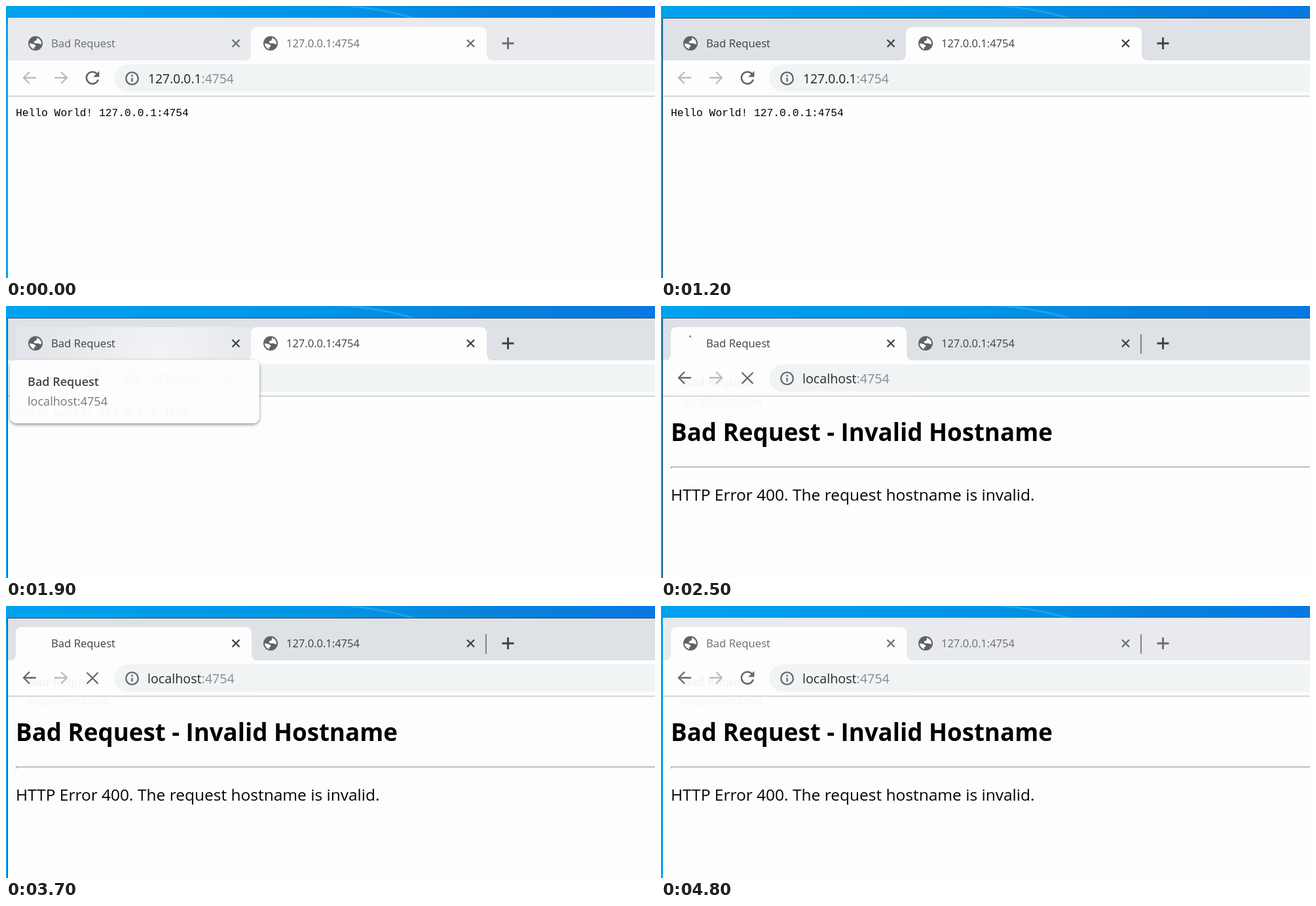
Recreate the animation shown at these times as an HTML page. Size 991 px wide and 415 px high, loop 4.9 s.

```html
<!DOCTYPE html>
<html lang="en">
<head>
<meta charset="utf-8">
<title>Browser tabs</title>
<style>
  html, body { margin: 0; height: 100%; overflow: hidden; }
  svg { display: block; width: 991px; height: 415px; font-family: "Open Sans", "Noto Sans", sans-serif; }
  text { white-space: pre; }
  .line { fill: none; stroke-width: 2.3; }
  #chrome { --ink: #3c4043; --strip: #dee1e6; }
  #chrome.idle { --ink: #6a6d71; --strip: #e8eaed; }
  .title { font-size: 16.7px; fill: var(--ink); }
  .ink { stroke: var(--ink); }
  .url { font-size: 19.3px; fill: #202124; }
  .port { fill: #80868b; }
</style>
</head>
<body>
<svg viewBox="0 0 991 415">
  <defs>
    <linearGradient id="sky">
      <stop offset="0" stop-color="#00a2f0"/>
      <stop offset=".5" stop-color="#0094e6"/>
      <stop offset=".75" stop-color="#0682dc"/>
      <stop offset="1" stop-color="#0878e2"/>
    </linearGradient>
    <radialGradient id="glow" gradientUnits="userSpaceOnUse" cx="220" cy="72" r="190">
      <stop offset="0" stop-color="#fff" stop-opacity=".6"/>
      <stop offset="1" stop-color="#fff" stop-opacity=".15"/>
    </radialGradient>
    <filter id="shadow" x="-10%" y="-20%" width="120%" height="150%">
      <feDropShadow dx="0" dy="2" stdDeviation="2.5" flood-color="#000" flood-opacity=".45"/>
    </filter>
    <path id="tab" d="M-10 83q10 0 10-10V42q0-10 10-10H350q10 0 10 10V73q0 10 10 10z"/>
    <g id="globe">
      <circle r="11" fill="#5f6368"/>
      <path fill="#fdfdfd" d="M2-8.5C6-7.5 9-4 9 0V1C7 2 6 0 4 0H0C-3 0-3-4 0-4C2-4 2-6 2-8.5zM-9 0L-3.5 1C0 2 1 4 0 5L-2 6V8.7C-6 7.5-9 4-9 0z"/>
    </g>
    <path id="close" d="M-5.5-5.5l11 11m0-11l-11 11"/>
    <path id="arrow" d="M10 0H-9M0-9L-9 0L0 9"/>
  </defs>

  <rect width="991" height="415" fill="url(#sky)"/>
  <path d="M510 0q60 5 105 18h12Q580 5 540 0z" fill="#5cc4ff" opacity=".35"/>

  <g id="chrome">
    <rect x="3" y="18" width="988" height="70" fill="var(--strip)"/>
    <path id="edge" class="line" d="M2.5 415V18.5H991" stroke="#1b4a70" style="stroke-width:1"/>
    <rect x="3" y="83" width="988" height="332" fill="#fdfdfd"/>
    <use id="hover" href="#tab" x="15" fill="url(#glow)"/>
    <use id="activeTab" href="#tab" fill="#fdfdfd"/>
    <path id="divider" d="M733 43V73" stroke="#80848a" stroke-width="2"/>
    <use id="icon0" href="#globe" x="45" y="57"/>
    <use id="icon1" href="#globe" x="404" y="57"/>
    <circle id="dot" cy="46.5" r="1.7" fill="#8b8e92"/>
    <text class="title" x="69" y="63">Bad Request</text>
    <text class="title" x="428" y="63" style="font-size:16.5px">127.0.0.1:4754</text>
    <g class="line ink">
      <use href="#close" x="351" y="57"/>
      <use href="#close" x="709.5" y="57"/>
      <path d="M757.5 57h18m-9-9v18" stroke-width="2.8"/>
    </g>
  </g>

  <g class="line" stroke="#5f6368">
    <use id="back" href="#arrow" x="36" y="109.5"/>
    <use href="#arrow" transform="translate(84 109.5) scale(-1 1)" stroke="#b9bcc0"/>
    <path id="stop" d="M123.5 101.5l17 17m0-17l-17 17"/>
  </g>
  <path id="reload" fill="#5f6368" transform="translate(116.4 94) scale(1.3)" d="M17.65 6.35C16.2 4.9 14.21 4 12 4c-4.42 0-7.99 3.58-7.99 8s3.57 8 7.99 8c3.73 0 6.84-2.55 7.73-6h-2.08c-.82 2.33-3.04 4-5.65 4-3.31 0-6-2.69-6-6s2.69-6 6-6c1.66 0 3.14.69 4.22 1.78L13 11h7V4z"/>
  <rect x="165" y="89" width="860" height="42" rx="21" fill="#f1f4f5"/>
  <g class="line" stroke="#5f6368">
    <circle cx="192.5" cy="110.5" r="9.3"/>
    <path d="M192.5 109.5v6m0-10.5v2.4"/>
  </g>
  <path d="M3 137.5H991" stroke="#b5b6b8"/>

  <g id="hello">
    <text class="url" x="217" y="118">127.0.0.1<tspan class="port">:4754</tspan></text>
    <text id="greeting" x="15" y="168" font-size="16.3" font-family="'Liberation Mono', monospace">Hello World! 127.0.0.1:4754</text>
  </g>
  <g id="error">
    <text class="url" x="216" y="118" style="font-size:19.7px">localhost<tspan class="port">:4754</tspan></text>
    <text x="15" y="206" font-size="36.7" font-weight="700">Bad Request - Invalid Hostname</text>
    <path d="M15 245.5H991M15.5 245v3" stroke="#959595"/>
    <path d="M16 247H991" stroke="#e6e6e6"/>
    <text x="15" y="297" font-size="24.5">HTTP Error 400. The request hostname is invalid.</text>
  </g>

  <g id="card">
    <rect x="6" y="82" width="381" height="97" rx="10" fill="#fefefe" filter="url(#shadow)"/>
    <text x="33" y="122" font-size="18" font-weight="600" fill="#3c4043">Bad Request</text>
    <text x="33" y="152" font-size="18.1" fill="#70757a">localhost:4754</text>
  </g>
</svg>
<script>
  const LOOP = 4900;
  const $ = id => document.getElementById(id);
  const show = (id, opacity) => $(id).setAttribute('opacity', +opacity);

  // Each entry holds from its time until the next one.
  const loading = [[0, ''], [700, 'dot'], [800, ''], [1100, 'dot'], [1200, ''],
    [2500, 'dot'], [2600, ''], [2900, 'dot'], [3000, ''], [3100, 'dot'], [3200, 'blank'],
    [3400, ''], [3500, 'dot'], [3600, 'blank'], [3800, ''],
    [4300, 'dot'], [4400, 'blank'], [4600, '']];
  const hover = [[0, 0], [1600, .5], [1700, .8], [1800, 1], [2000, 0]];
  const card = [[0, 0], [1700, .5], [1800, .93], [1900, .97], [2000, .4], [2100, .04]];
  const edge = [[0, 0], [300, .5], [400, 1], [4800, 0]];
  const valueAt = (track, t) => track.findLast(([start]) => start <= t)[1];

  function draw() {
    const t = performance.now() % LOOP;
    const onError = t >= 2000;
    const state = valueAt(loading, t);
    const current = onError ? 0 : 1;

    $('chrome').classList.toggle('idle', t < 300 || t >= 4800);
    $('activeTab').setAttribute('x', onError ? 15 : 374);
    $('back').setAttribute('stroke', onError ? '#5f6368' : '#b9bcc0');
    $('dot').setAttribute('cx', onError ? 44.5 : 403.5);
    for (const i of [0, 1]) show('icon' + i, i !== current || !state);
    show('dot', state === 'dot');
    show('stop', state !== '');
    show('reload', state === '');
    show('divider', onError);
    show('hello', !onError);
    show('error', onError);
    show('greeting', t < 1100 || t >= 1200);
    show('hover', valueAt(hover, t));
    show('card', valueAt(card, t));
    show('edge', valueAt(edge, t));
    requestAnimationFrame(draw);
  }
  draw();
</script>
</body>
</html>
```
